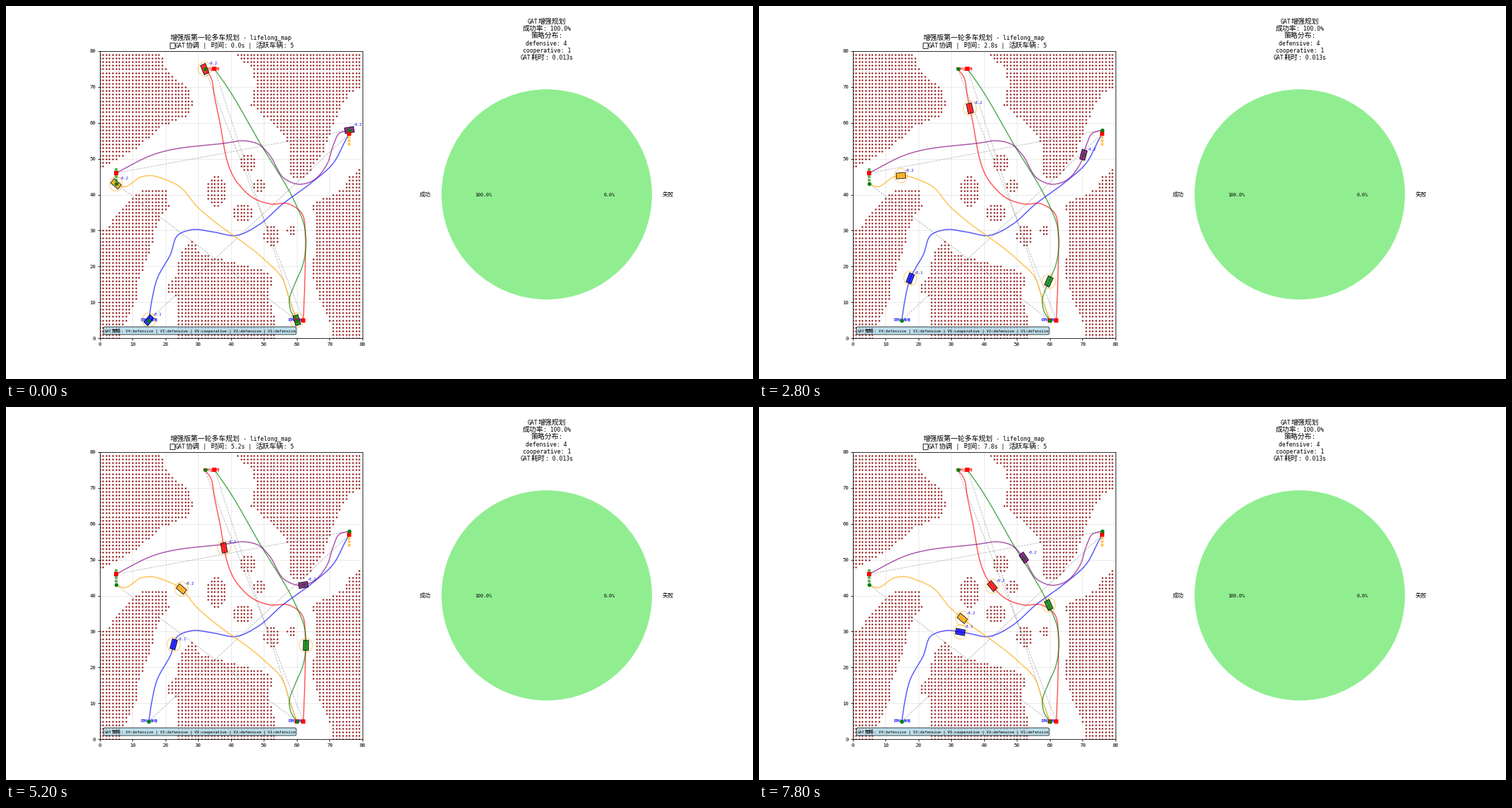
A matplotlib script for the animation above (8000 ms loop, 1058 by 529 pixels).

```python
from itertools import groupby

import matplotlib.pyplot as plt
import numpy as np
from matplotlib.animation import FuncAnimation
from matplotlib.patches import Circle, FancyBboxPatch, Polygon, Rectangle
from matplotlib.path import Path

W, H, DPI = 1058, 529, 64
FRAMES, STEP = 40, 0.2
SIZE = 80
LEFT, TOP, AX_W, AX_H = 132.5, 64, 372.5, 407
CJK, MONO = "Noto Sans CJK JP", "DejaVu Sans Mono"
MONO_SCALE = 0.5 / 0.602  # makes a Latin letter half an em wide


def pt(px):
    return px * 72 / DPI


fig = plt.figure(figsize=(W / DPI, H / DPI), dpi=DPI, facecolor="white")
ax = fig.add_axes([LEFT / W, 1 - (TOP + AX_H) / H, AX_W / W, AX_H / H])
stage = fig.add_axes([0, 0, 1, 1], zorder=2)
stage.set(xlim=(0, W), ylim=(H, 0))
stage.axis("off")


def put(x, y, text, em, ha="center"):
    """Text on a baseline: full-width CJK, half-width Latin."""
    runs = [(wide, "".join(g))
            for wide, g in groupby(text, lambda ch: ord(ch) > 0x2E80)]
    widths = [len(s) * em * (1 if wide else 0.5) for wide, s in runs]
    x -= sum(widths) * {"left": 0, "center": 0.5, "right": 1}[ha]
    parts = []
    for (wide, s), width in zip(runs, widths):
        parts.append(stage.text(x, y, s, family=CJK if wide else MONO,
                                size=pt(em if wide else em * MONO_SCALE),
                                ha="left", va="baseline"))
        x += width
    return parts


# Map frame
ax.set(xlim=(0, SIZE), ylim=(0, SIZE))
ax.set_axisbelow(True)
ax.grid(True, color="#b0b0b0", alpha=0.3, lw=pt(0.8))
ax.tick_params(length=pt(2.6), width=pt(0.8), pad=pt(3))
for label in ax.get_xticklabels() + ax.get_yticklabels():
    label.set(family=MONO, size=pt(7.3))
for spine in ax.spines.values():
    spine.set_linewidth(pt(0.8))

# Obstacles: grid points inside rough outlines and small ellipses
OUTLINES = [
    # top left
    [(-1, 81), (18.5, 81), (19.5, 75.5), (27, 69.5), (28.6, 65), (26.5, 62),
     (18, 58.6), (11.5, 52.8), (0, 47.5), (-1, 47.5)],
    # top right
    [(40.6, 81), (41.5, 78.4), (46.5, 75), (47.4, 71), (45.8, 65), (54, 59),
     (57.4, 54), (57.8, 46), (59, 44.6), (62, 44.6), (68, 51.8),
     (72.4, 62.7), (76, 68.5), (81, 71), (81, 81)],
    # right
    [(81, 49), (75.8, 45), (74.2, 42), (64.8, 37.5), (65.8, 29), (64.5, 18),
     (66.8, 11), (70.5, 3), (70, -1), (81, -1)],
    # bottom left
    [(-1, 30.4), (2, 30.6), (8, 38), (13, 41.4), (20.2, 41.4), (21.2, 37),
     (17.5, 32), (14.8, 23), (11.8, 16), (11, 10), (6.4, 2), (6.2, -1),
     (-1, -1)],
    # bottom
    [(23.7, -1), (23.4, 11), (20.8, 13), (20.8, 15.4), (23.4, 18),
     (24.4, 24), (28, 27.4), (31, 23.7), (50, 18.8), (52.3, 17),
     (51.5, 10.5), (53.4, 5), (53.4, -1)],
]
ISLANDS = [(35.5, 41, 3, 4.6), (44.9, 49, 2.4, 2.6), (48.6, 42.5, 1.9, 2),
           (43.5, 35, 2.9, 2.6), (52.2, 28.6, 2.4, 2.9), (58.3, 30, 1.4, 1.5)]
cells = np.stack(np.meshgrid(range(SIZE), range(SIZE)), -1).reshape(-1, 2)
blocked = np.zeros(len(cells), bool)
for outline in OUTLINES:
    blocked |= Path(outline).contains_points(cells)
for cx, cy, rx, ry in ISLANDS:
    blocked |= np.hypot(*((cells - (cx, cy)) / (rx, ry)).T) <= 1
ax.plot(*cells[blocked].T, "o", color="darkred", ms=pt(2.3), mew=0, zorder=1)


def arc_length(p):
    return np.r_[0, np.cumsum(np.hypot(*np.diff(p, axis=0).T))]


def smooth(points, n=800):
    """Cubic Hermite curve through the points."""
    p = np.array(points, float)
    s = arc_length(p)
    m = np.gradient(p, s, axis=0)
    u = np.linspace(0, s[-1], n)
    i = np.clip(np.searchsorted(s, u, "right") - 1, 0, len(s) - 2)
    h = (s[i + 1] - s[i])[:, None]
    t = (u - s[i])[:, None] / h
    return ((2 * t**3 - 3 * t**2 + 1) * p[i] + (t**3 - 2 * t**2 + t) * h * m[i]
            + (3 * t**2 - 2 * t**3) * p[i + 1] + (t**3 - t**2) * h * m[i + 1])


class Car:
    BODY = np.array([(-1.4, -0.8), (1.4, -0.8), (1.4, 0.8), (-1.4, 0.8)])

    def __init__(self, color, route, heading, speed=4.55, lag=0.2,
                 label=None, defensive=True):
        self.heading, self.speed, self.lag = heading, speed, lag
        self.curve = smooth(route)
        self.length = arc_length(self.curve)
        self.slope = np.gradient(self.curve, self.length, axis=0)
        start, goal = route[0], route[-1]
        ax.plot(*zip(start, goal), "--", color="gray", alpha=0.6,
                lw=pt(0.8), zorder=2)
        ax.plot(*self.curve.T, color=color, alpha=0.65, lw=pt(1.5), zorder=3)
        ax.plot(*start, "o", color="green", ms=pt(5.5), mew=0, zorder=7)
        ax.plot(*goal, "s", color="red", ms=pt(5.5), mew=0, zorder=6)
        self.body = ax.add_patch(Polygon(self.BODY, fc=color, ec="black",
                                         alpha=0.8, lw=pt(1), zorder=4))
        self.ring = self.icon = self.label = None
        if defensive:
            self.ring = ax.add_patch(Circle(start, 2, fill=False, ec="orange",
                                            alpha=0.55, lw=pt(1), zorder=4))
        else:
            self.icon, = ax.plot([], [], "s", mfc="none", mec="darkgreen",
                                 ms=pt(3.5), mew=pt(0.9), zorder=5)
        if label:
            self.label = ax.text(0, 0, label, color="blue", family=MONO,
                                 size=pt(6.5 * MONO_SCALE), va="bottom",
                                 zorder=8)

    def at(self, d, values):
        return np.array([np.interp(d, self.length, v) for v in values.T])

    def move(self, t):
        # speed rises to cruising with time constant lag
        d = self.speed * (t - self.lag * (1 - np.exp(-t / self.lag)))
        x, y = self.at(d, self.curve)
        dx, dy = self.at(d, self.slope)
        angle = np.arctan2(dy, dx)
        first = np.arctan2(*self.slope[0][::-1])
        turn = (np.radians(self.heading) - first + np.pi) % (2 * np.pi) - np.pi
        angle += turn * max(0, 1 - t / 0.6)
        c, s = np.cos(angle), np.sin(angle)
        self.body.set_xy(self.BODY @ np.array([[c, s], [-s, c]]) + (x, y))
        if self.ring:
            self.ring.center = x, y
        if self.icon:
            self.icon.set_data([x], [y])
        if self.label:
            self.label.set_position((x + 1, y + 1))


cars = [
    Car("blue", [(15, 5), (15.8, 10), (17.5, 16.5), (21.6, 23.4),
                 (23.8, 28.7), (28, 30.2), (34.5, 29.6), (41.4, 28.6),
                 (48.5, 31.6), (55.3, 37.1), (64.3, 43.2), (71.2, 48.9),
                 (75.1, 55.6), (76, 57)],
        48, speed=4.6, label="-0.1"),
    Car("orange", [(5, 43), (7.3, 42.2), (12.8, 45), (15.5, 45.3),
                   (19.7, 44.3), (24.4, 42.2), (29.6, 36.7), (33.2, 33.8),
                   (50, 22), (55.3, 17.1), (58.1, 9.6), (60, 5)],
        -38, lag=0.46, label="-0.2"),
    Car("red", [(32, 75), (33.7, 73), (34.9, 67.6), (36.2, 61.9), (42.2, 43),
                (46.7, 39.1), (52, 37.4), (57.5, 37.4), (61.5, 34.8),
                (62.6, 28.7), (62.6, 21.8), (62, 5)],
        -66, label="-0.2"),
    Car("green", [(60, 5), (58.3, 7.3), (57.7, 10.4), (59.2, 14.7),
                  (61.9, 20.6), (62.2, 31.6), (60, 36.7), (48.9, 54.2),
                  (38.6, 70.3), (35, 75)],
        108),
    Car("purple", [(76, 58), (72.8, 57), (71.2, 54), (69.2, 48.5),
                   (64.5, 43.7), (60.5, 42.9), (56.5, 44.3), (51.5, 51.3),
                   (48.8, 53.8), (44.2, 55), (38.8, 54.4), (15.6, 50.9),
                   (5, 46)],
        189, speed=5.2, lag=0.95, label="-0.2", defensive=False),
]

# Waiting columns
for color, x, rows in (("green", 5, (47, 45, 44)),
                       ("orange", 76, (57, 56, 55, 54))):
    ax.plot([x] * len(rows), rows, "s", color=color, alpha=0.6,
            ms=pt(4.5), mew=0, zorder=5)

# Start notes and strategy bar
for x, y, color in ((15, 5, "blue"), (60, 5, "blue"), (34, 75, "red")):
    ax.text(x, y, "防御性策略", family=CJK, size=pt(4.9), color=color,
            ha="center", va="center_baseline", zorder=5)
stage.add_patch(FancyBboxPatch((139.5, 456.5), 270, 8,
                               boxstyle="round,pad=1.5,rounding_size=2",
                               fc="lightblue", ec="black", alpha=0.8,
                               lw=pt(0.9)))
put(140, 463, "GAT策略: V4:defensive | V3:defensive | V5:cooperative"
    " | V2:defensive | V1:defensive", 6.5, "left")

# Titles
put(318.7, 47.5, "增强版第一轮多车规划 - lifelong_map", 9.85)
stage.add_patch(Rectangle((231.5, 51.5), 7, 8, fill=False, lw=pt(0.8)))
clock = put(240, 59.2, "GAT协调 | 时间: 0.0s | 活跃车辆: 5", 9.85, "left")[4]

# Result pie
stage.add_patch(Circle((765.9, 267.2), 149, color="lightgreen", lw=0))
put(602, 270, "成功", 8, "right")
put(930, 270, "失败", 8, "left")
put(676.3, 269.6, "100.0%", 8)
put(855.1, 269.6, "0.0%", 8)
for i, line in enumerate(("GAT增强规划", "成功率: 100.0%", "策略分布:",
                          "defensive: 4", "cooperative: 1",
                          "GAT耗时: 0.013s")):
    put(766, 24.6 + 10.3 * i, line, 9.85)


def update(frame):
    t = frame * STEP
    clock.set_text(f": {t:.1f}s | ")
    for car in cars:
        car.move(t)
    return []


anim = FuncAnimation(fig, update, frames=FRAMES, interval=STEP * 1000,
                     repeat=True, blit=False)
plt.show()
```
